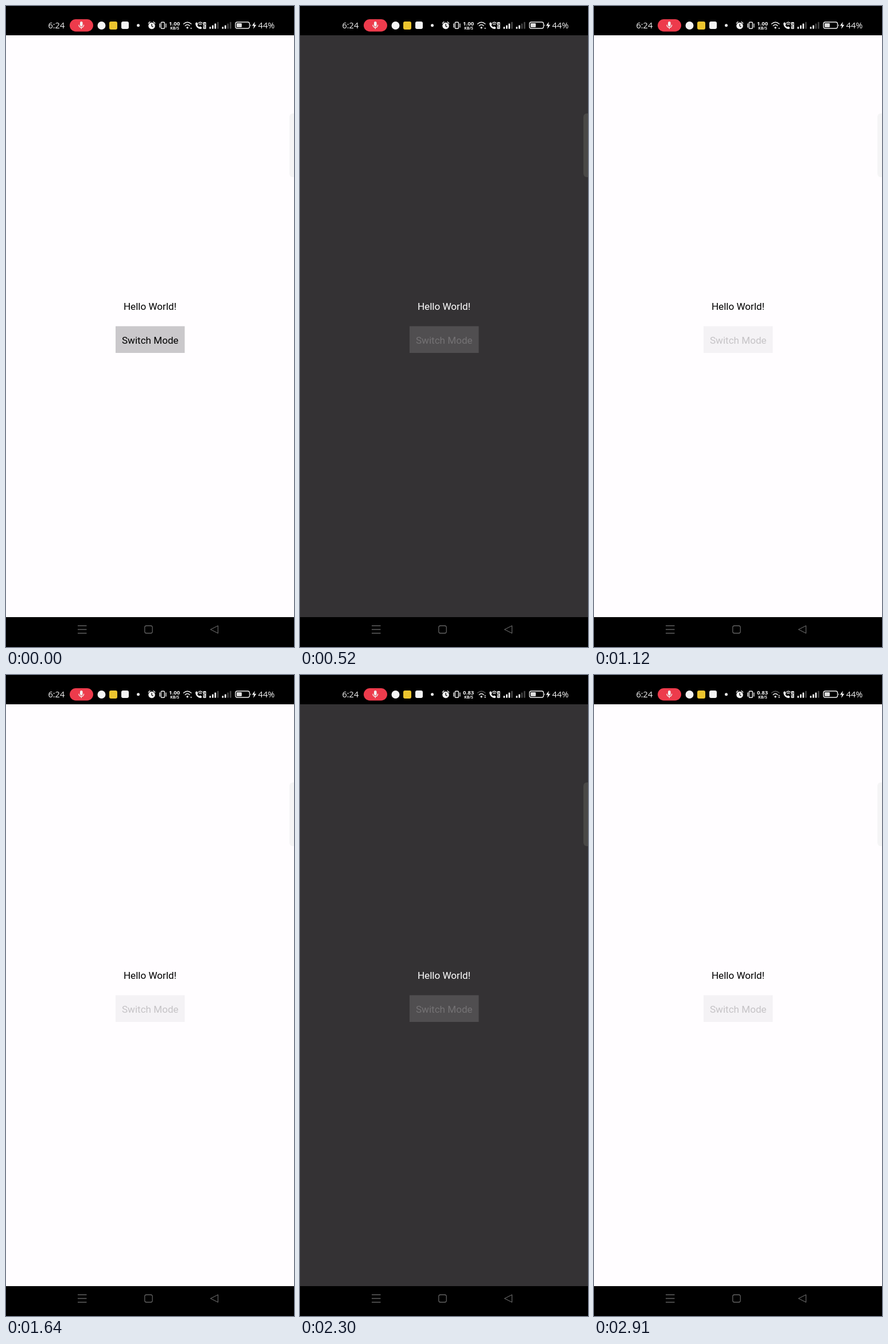
Write an HTML page that moves like this. It is 502x1116 px and loops after 3000 ms.

```html
<!DOCTYPE html>
<html lang="en">
<head>
<meta charset="utf-8">
<title>Switch Mode</title>
<style>
  html, body { margin: 0; width: 100%; height: 100%; overflow: hidden; background: #000; }
  svg { display: block; width: 100vw; height: 100vh; }
  .label { font: 17.1px Roboto, sans-serif; text-anchor: middle; }
  .status { font: 500 14.6px "Open Sans", "Noto Sans", sans-serif; fill: #f4f4f4; }
  .rate { font-family: "Open Sans", "Noto Sans", sans-serif; font-weight: 700; text-anchor: middle; fill: #f4f4f4; }
  .line { fill: none; stroke: #f0f0f0; stroke-width: 1.4; stroke-linecap: round; stroke-linejoin: round; }
  .nav { fill: none; stroke: #606060; stroke-width: 1.3; stroke-linejoin: round; }
</style>
</head>
<body>
<svg viewBox="0 0 502 1116">
  <rect width="502" height="1116"/>
  <rect id="page" y="51" width="502" height="1013"/>
  <rect id="tab" x="494" y="187" width="20" height="111" rx="6"/>
  <text id="hello" class="label" x="251" y="529">Hello World!</text>
  <rect id="button" x="191" y="557.5" width="120.5" height="46.5"/>
  <text id="caption" class="label" x="251.3" y="588">Switch Mode</text>

  <g fill="#f4f4f4">
    <text class="status" x="73.4" y="39">6:24</text>
    <rect x="111" y="23" width="41" height="21.5" rx="10.75" fill="#ed3b4c"/>
    <rect x="129" y="27" width="4.6" height="8.5" rx="2.3"/>
    <path class="line" stroke-width="1.2" d="M127 33.3a4.3 4 0 0 0 8.6 0M131.3 37.5v2"/>
    <circle cx="166.5" cy="34" r="7"/>
    <rect x="180" y="27" width="14" height="14" rx="3" fill="#ecc52e"/>
    <rect x="201" y="27" width="13" height="13" rx="3"/>
    <circle cx="230.5" cy="33.7" r="2.5"/>

    <circle cx="254" cy="34.5" r="5.8"/>
    <path class="line" d="M248.3 30l2.7-2.4M259.7 30l-2.7-2.4"/>
    <path d="M254 31v3.8l2.6 1.6" fill="none" stroke="#000" stroke-width="1.2"/>
    <rect class="line" x="270.3" y="28.3" width="6" height="11" rx="1"/>
    <path class="line" d="M267.9 31v6M278.8 31v6"/>

    <text id="rate" class="rate" x="293.6" y="33.5" font-size="9.6"></text>
    <text class="rate" x="294" y="40.6" font-size="6.8">KB/S</text>

    <path id="outerArc" class="line" d="M309.5 31.3q6.7-6.2 13.4 0"/>
    <path class="line" d="M312.2 34.4q4-3.6 8 0"/>
    <circle cx="316.2" cy="37.8" r="1.7"/>
    <path id="upload" d="M321 36.5l1.7-2 1.7 2z"/>
    <path d="M321 38l1.7 2 1.7-2z"/>

    <path d="M330.3 29.5l2.6-1.2 2 3.4-1.5 1.6q1.3 2.4 3.4 3.5l1.6-1.4 3.2 2-1.3 2.5c-5.5 1-10.8-5-10-10.4z"/>
    <path class="line" stroke-width="1.2" d="M335.5 29.8q3.2-3 6.5 0M337 32q1.8-1.6 3.5 0"/>
    <rect x="343.7" y="28" width="5" height="12" rx="1"/>
    <path d="M345 30.3h2.2v2.6H345v3h2.4M345 38h2.4" fill="none" stroke="#000" stroke-width=".8"/>

    <g id="signals"></g>

    <rect class="line" x="400" y="28" width="24.5" height="11" rx="3.2"/>
    <rect x="402" y="30" width="9" height="7" rx="1.2" fill="#ddd"/>
    <path d="M426 31.5q1.6 2 0 4z"/>
    <path d="M433.8 27.5l-5 7h3.3l-1 5.5 5.2-7.3h-3.4z"/>
    <text class="status" x="439.6" y="39">44%</text>
  </g>

  <path class="nav" d="M125 1079h15.5M125 1085.5h15.5M125 1092h15.5M369.5 1079v13l-13-6.5z"/>
  <rect class="nav" x="241.8" y="1079" width="13.4" height="13" rx="3"/>
</svg>
<script>
const LOOP = 3000, FRAME = 30, FADE = 230;

// Each tap: press dims the button, the theme flips, then the button fades back.
const taps = [
  { press: 370, flip: 520, fade: 550, end: 730 },
  { press: 1000, flip: 1120, fade: 1180, end: 1300 },
  { press: 1640, flip: 1730, fade: 1790, end: 1940 },
  { press: 2300, flip: 2400, fade: 2460, end: 2610 },
  { press: 2910, flip: Infinity, fade: Infinity, end: Infinity },
];

const themes = {
  light: {
    page: '#fffdff', tab: '#f5f5f6', text: '#000',
    button: [[244, 242, 245], [202, 200, 203]], caption: [[197, 195, 198], [0, 0, 0]],
  },
  dark: {
    page: '#343234', tab: '#4a4947', text: '#fff',
    button: [[80, 78, 80], [202, 200, 203]], caption: [[116, 114, 116], [255, 255, 255]],
  },
};

const el = id => document.getElementById(id);
const paint = (id, color) => el(id).setAttribute('fill', color);
const mix = ([from, to], p) => `rgb(${from.map((v, i) => Math.round(v + (to[i] - v) * p))})`;
const easeInOut = p => p < 0.5 ? 2 * p * p : 1 - 2 * (1 - p) ** 2;

for (const left of [354.5, 376.5]) {
  for (let i = 0; i < 4; i++) {
    const height = 3.5 + i * 2.8;
    el('signals').insertAdjacentHTML('beforeend',
      `<rect x="${left + i * 4.5}" y="${39.7 - height}" width="2.7" height="${height}" rx=".8"/>`);
  }
}
const bars = [...el('signals').children];

function brightness(t) {
  const tap = taps.findLast(({ press }) => t >= press);
  if (!tap || t >= tap.end) return 1;
  if (t < tap.fade) return 0;
  const shown = tap.fade + Math.floor((t - tap.fade) / FRAME) * FRAME;
  return easeInOut(1 - (tap.end - shown) / FADE);
}

function draw(t) {
  const flips = taps.filter(({ flip }) => t >= flip).length;
  const theme = flips % 2 ? themes.dark : themes.light;
  const level = brightness(t);
  paint('page', theme.page);
  paint('tab', theme.tab);
  paint('hello', theme.text);
  paint('button', mix(theme.button, level));
  paint('caption', mix(theme.caption, level));

  const slower = t >= 1850;
  el('rate').textContent = slower ? '0.83' : '1.00';
  el('outerArc').style.stroke = slower ? '#555' : '#f0f0f0';
  el('upload').style.opacity = t >= 1730 ? 1 : 0;
  const secondSim = t >= 2400 ? 3 : 2;
  bars.forEach((bar, i) => {
    const lit = i % 4 < (i < 4 ? 3 : secondSim);
    bar.setAttribute('fill', lit ? '#f4f4f4' : '#444');
  });
}

const start = performance.now();
function tick() {
  draw((performance.now() - start) % LOOP);
  requestAnimationFrame(tick);
}
tick();
</script>
</body>
</html>
```
